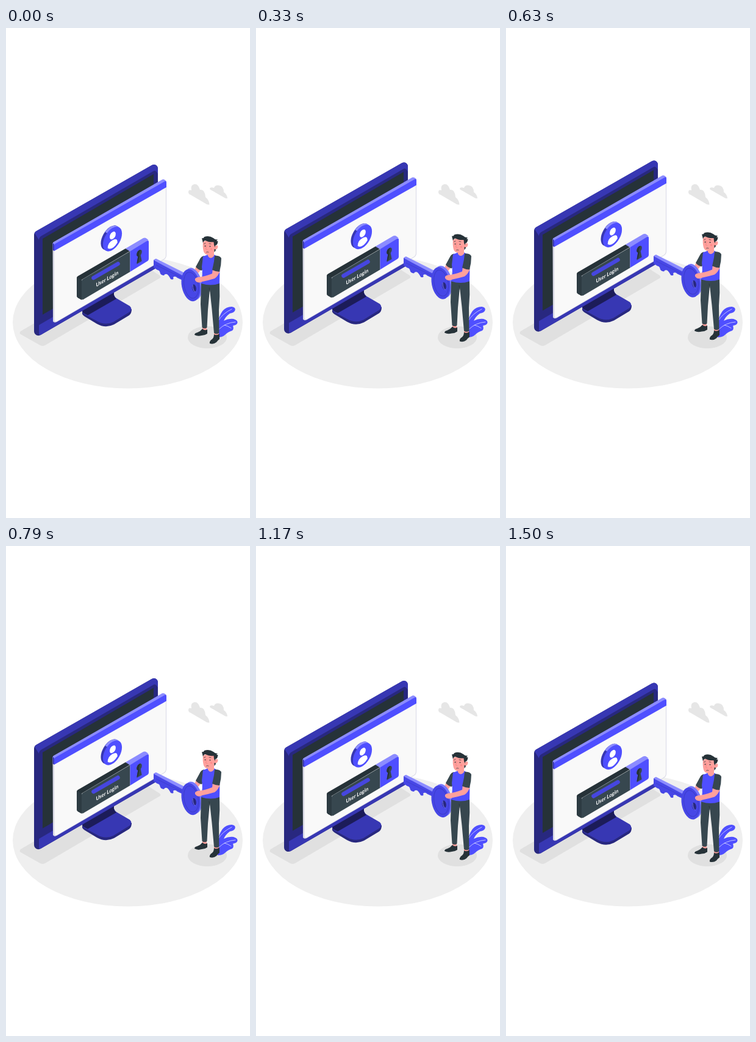
An HTML page for the animation above (1.54 s loop, 400 by 800 pixels).

```html
<!DOCTYPE html>
<html lang="en">
<head>
<meta charset="utf-8">
<title>User Login</title>
<style>
  html, body { margin: 0; height: 100%; overflow: hidden; background: #fff; }
  svg { display: block; width: 100vw; height: 100vh; }
  text { font: 700 9px Lato, sans-serif; fill: #fff; }
  .line { fill: none; stroke-linecap: round; stroke-linejoin: round; }
  .blue { fill: #4f4fff; }
  .blue-light { fill: #8c8cff; }
  .blue-soft { fill: #4747e6; }
  .blue-mid { fill: #3737b3; }
  .blue-dark { fill: #28287f; }
  .blue-deep { fill: #1c1c59; }
  .slate { fill: #37474f; }
  .ink { fill: #263238; }
  .skin { fill: #ffa09c; }
  .shade { fill: #e0e0e0; }
  .cloud { fill: #e6e6e6; }
</style>
</head>
<body>
<svg viewBox="0 0 400 800">
  <!-- ground -->
  <ellipse cx="199.5" cy="480.5" rx="188.5" ry="108" fill="#efefef"/>
  <path class="shade" d="M24 495L214 385Q218 383 222 385L252 404Q255 407 251 409L64 518Q60 520 56 518L24 500Q21 498 24 495Z"/>
  <ellipse class="shade" cx="330" cy="505" rx="32" ry="18"/>

  <!-- clouds -->
  <path class="cloud" d="M299 268Q299 263 304 265Q302 256 309 255Q315 254 318 264Q326 263 327 276Q333 281 333.500 288.500Q330 289 326 286L302 272Q299 271 299 268Z"/>
  <path class="cloud" d="M334 262Q335 259 341 261Q343 256 349 257Q357 258 357 268Q362 271 363 278Q361 279 358 277L337 265Q334 264 334 262Z"/>

  <!-- plant -->
  <path class="blue" d="M347 483Q349 470 355 462Q361 455 370 455Q377 456 375.500 461Q374 465 367 466Q360 471 357 478Q365 474 373 475Q380 477 379.500 481Q379 485 372 486Q374 491 371 494Q364 496 359 501Q355 505 347 505Z"/>
  <path class="line" stroke="#d0d0ff" stroke-width=".9" d="M348 478Q355 466 370 459M349 492Q360 481 376 480M358 485Q363 486 369 490"/>

  <g id="float">
    <!-- stand -->
    <path class="blue-dark" d="M125 462V467Q126 469 129 471L149 483Q163 491 177 484L202 469Q206 466 206 459Z"/>
    <path class="blue-mid" d="M125 461L176 432Q177 440 184 443L203 454Q208 459 202 464L176 480Q163 486 150 479L128 467Q124 464 125 461Z"/>
    <path class="blue-deep" d="M125 461L177 428V436Q178 440 181 442L134 469L128 466Q125 464 125 461Z"/>

    <!-- monitor -->
    <path class="blue-dark" d="M46 338Q46 334 49 332L239 224Q243 222 246 224Q249 226 249 230V386Q249 390 246 392L57 501Q54 503 50 501.500Q46 499 46 495Z"/>
    <path class="blue-mid" d="M47 335Q47.500 333 49 332L239 224Q243 222 246 224Q249 226 249 230V238L246 234Q244 232 241 234L58 339.500Q54 342 54 346Z"/>
    <path class="ink" d="M60 344L242 238.500V362L60 468Z"/>
    <path class="blue-mid" d="M54 485L249 372V386Q249 390 246 392L57 501Q54 502 54 499Z"/>

    <!-- browser window -->
    <path fill="#d9d9e6" d="M76.500 352Q76.500 350 79 349L259 247.500L263 250V371Q263 376 259 378L83 480Q79 482 77 479Z"/>
    <path fill="#f9f9f9" d="M79 363L262 259V371Q262 375 258 377.500L84 478.500Q79.500 481 79.500 476Z"/>
    <path class="blue-light" d="M76.500 352Q76.500 350 79 349L256 247.500Q259 246 262.500 250L79 354Z"/>
    <path class="blue-mid" d="M76.500 351L79 353V364L76.500 362.500Z"/>
    <path class="blue" d="M79 355Q79 353 81 352L260 250.500Q263 249 263 252V260L79 364Z"/>

    <!-- avatar badge -->
    <g transform="matrix(.866 -.5 0 1 174.500 344.500)">
      <circle class="blue-mid" cx="-4" cy="-4" r="18"/>
      <path class="blue-light" d="M-14 -18.500A18 18 0 0 1 8 -17.500L12 -13.500L-10 -14.500Z"/>
      <circle class="blue" r="18"/>
      <circle cx=".5" cy="-5.500" r="5.700" fill="#fff"/>
      <path d="M-9 10.500Q-9 2 0 2Q9.500 2 9.500 10.500Q0 19 -9 10.500Z" fill="#fff"/>
    </g>

    <!-- login button -->
    <path class="ink" d="M116 408Q116 406 118 405L196 360L203.500 364L124 411V444L118 440.500Q116 439 116 437Z"/>
    <path class="slate" d="M124 413Q124 411 126 410L203.500 364.500V398L127 443Q124 444.500 124 442Z"/>
    <path fill="#2d3b42" d="M116.500 407L124 411V443.500L118 440.500Q116 439 116 437Z"/>
    <path class="blue-light" d="M196 360L225 343Q227.500 342 229.500 343L233.500 346L203.500 365Z"/>
    <path class="blue" d="M203.500 364.500L231 347.500Q234 346 234 349V377Q234 379 232 380.500L203.500 398Z"/>
    <g transform="matrix(.866 -.5 0 1 218.500 367.500)">
      <path class="slate" d="M-2 2H2L4.800 15.500H-4.800Z"/>
      <circle class="slate" r="4.900"/>
      <path class="ink" d="M-2.500 4.200A4.900 4.900 0 0 1 0 -4.900L2 -4Q-2 1 0 5L-2 14H-4.800Z"/>
    </g>
    <path class="line" stroke="#4646df" stroke-width="6.600" d="M143.500 408L183.500 385"/>
    <text transform="matrix(.866 -.5 0 1 147.500 423)">User Login</text>

    <!-- far arm -->
    <path class="skin" d="M313 387L307 399L290 400Q283 394 281 398L286 403L309 407L322 392Z"/>
    <path class="slate" d="M325 372Q320 372 317 379L311 390Q315 395 321 396L327 385Z"/>

    <!-- key -->
    <path class="blue-soft" d="M242 379L245 377L292 403V413L281 408Q277 404 274 407Q276 412 270 410Q267 404 264 402Q260 401 259 404Q255 404 253 401Q252 395 248 395L242 391Z"/>
    <path class="blue-light" d="M242 379L246 376.500L294 400.500L290 404.500Z"/>
    <path class="line" stroke="#3f3fcf" d="M246 387L289 408"/>
    <g transform="rotate(-11 303 420)">
      <ellipse fill="#7878ff" cx="307" cy="418.500" rx="14.500" ry="26.500"/>
      <ellipse class="blue-soft" cx="303" cy="420" rx="15" ry="26.500"/>
      <ellipse cx="303.500" cy="420" rx="11.500" ry="21.500" fill="none" stroke="#3c3ccc"/>
      <ellipse class="blue-dark" cx="307.500" cy="425.500" rx="3.300" ry="6"/>
    </g>
    <path class="line" stroke="#7878ff" d="M306 420Q306 428 310 431"/>

    <!-- legs and shoes -->
    <path class="skin" d="M322 488H329V496H322ZM341 496H349V504H341Z"/>
    <path class="ink" d="M322 491Q326 495 330 492V499Q326 502 321 502Q314 504 309 501Q309 498 314 497Q319 495 322 491ZM341 500Q345 503 350 499V508Q347 510 345 513Q340 517 334 515Q333 511 338 508Q341 505 341 500Z"/>
    <path class="slate" d="M320 416H350Q351 438 349 460L349.500 498Q345 501 341 498L337.500 459L334 427L331 460L329.500 489Q326 492 321.500 489L319 451Z"/>
    <path class="line" stroke="#263238" stroke-width=".8" d="M334 430L333 424"/>

    <!-- torso -->
    <path class="blue" d="M323 373L331 370H341L349 374Q351 390 350 417Q336 422 320 417Q323 401 321 390Z"/>
    <path class="skin" d="M331 362H341V372Q335 379 331 372Z"/>

    <!-- near arm -->
    <path class="skin" d="M339 393L351 396Q348 405 342 409Q332 412 322 414Q314 418 310 412Q309 408 314 407Q326 406 338 401Z"/>
    <path class="slate" d="M342 372Q350 371 353 376Q353 387 350 398Q344 398 338 395Q340 386 341 381Z"/>

    <!-- head -->
    <path class="skin" d="M323 349Q332 344 343 349V356Q347 353 347.500 357Q347 362 342 362Q341 369 334 370.500Q326 371 324 365Q322 358 323 349Z"/>
    <path class="ink" d="M323 351L321 343Q324 344 325 341Q333 338 340 343Q343 346 347 345.500L345 348H347.500Q347 352 345.500 354Q343 354 342.500 358Q340.500 355 340.500 349.500Q332 350 327 347Q324 347 323 351ZM341.500 361L344 361.500Q344 364 341.500 366Z"/>
    <path class="line" stroke="#263238" stroke-width=".7" d="M324.500 352.500L327 351.500M333 352L336 352.500M328.500 366Q330 365 332 366"/>
    <path class="line" stroke="#f0807f" stroke-width=".7" d="M329 354L327.500 361L330 362"/>
    <circle class="ink" cx="326.500" cy="356" r=".9"/>
    <circle class="ink" cx="334.500" cy="356.500" r=".9"/>
    <circle cx="336.500" cy="361" r="1.700" fill="#ff8a89"/>
  </g>
</svg>
<script>
  const LOOP = 1540, STEPS = 37, RISE = 8;
  const float = document.getElementById('float');

  function draw(now) {
    // linear rise and fall, stepped at 24 poses per second
    const step = Math.floor((now % LOOP + 4) * STEPS / LOOP);
    const phase = (step + 1) % STEPS / STEPS;
    const lift = RISE * (1 - Math.abs(2 * phase - 1));
    float.setAttribute('transform', `translate(0 ${(0.43 - lift).toFixed(2)})`);
    requestAnimationFrame(draw);
  }
  draw(performance.now());
</script>
</body>
</html>
```
